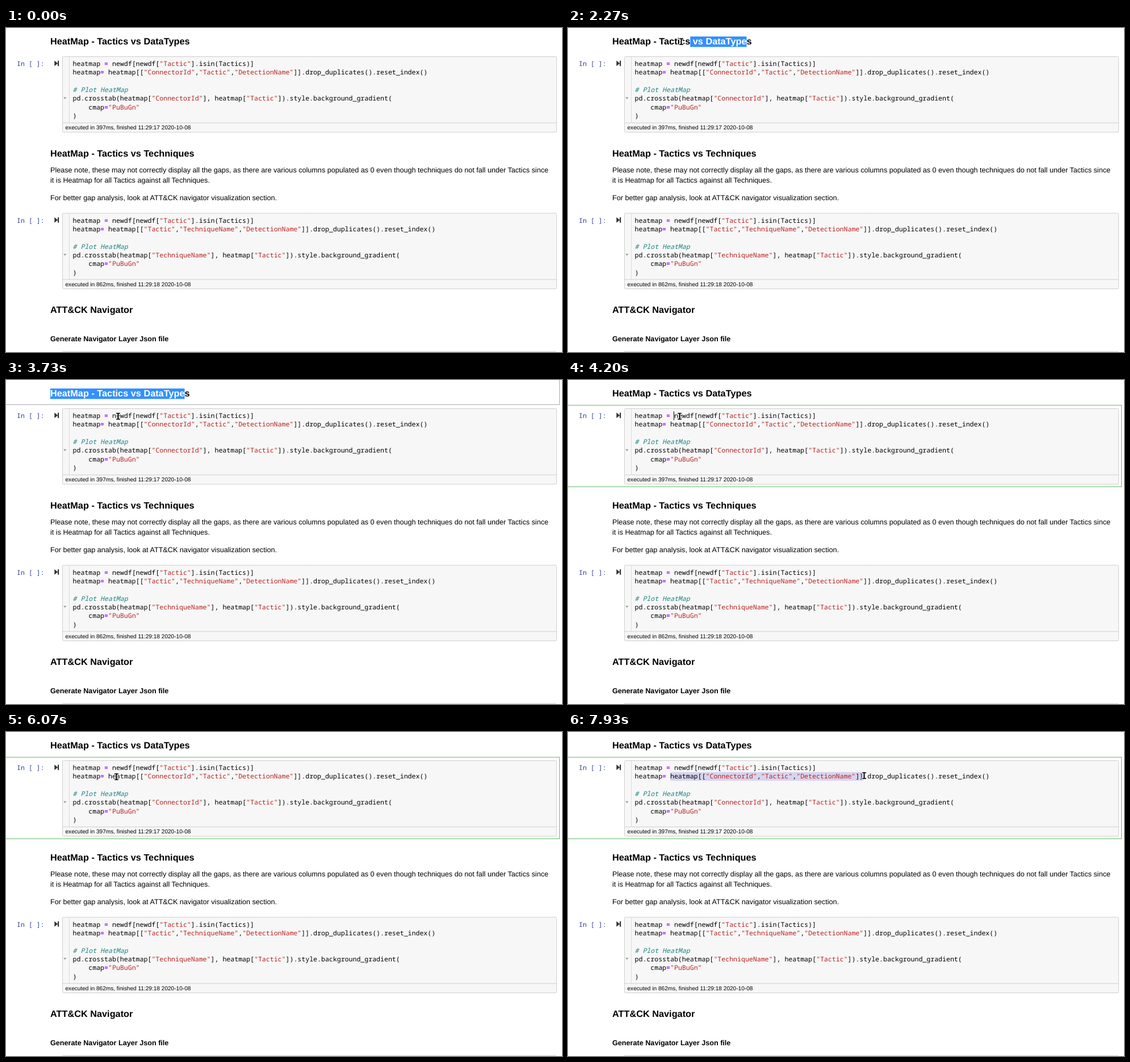
Write an HTML page with a canvas that moves like this. It is 979 by 572 pixels and loops after 8 s.

```html
<!DOCTYPE html>
<html lang="en">
<head>
<meta charset="utf-8">
<title>Notebook heatmaps</title>
<style>
html, body { margin: 0; width: 100%; height: 100%; overflow: hidden; background: #fff; }
canvas { display: block; }
</style>
</head>
<body>
<canvas id="stage" width="979" height="572"></canvas>
<script>
const ctx = document.getElementById('stage').getContext('2d');
const LOOP = 8000, FPS = 15;
const SANS = '"Liberation Sans", Arial, sans-serif';
const MONO = '"Noto Sans Mono", "DejaVu Sans Mono", monospace';
const BODY = `12.63px ${SANS}`;
const TITLE = `bold 16.29px ${SANS}`;
const CODE = `11.575px ${MONO}`;
const CHAR = 6.945, LINE = 15.3, LEFT = 78, CODE_X = 117.5, CODE_TOP = 55.4, CODE_BASE = 67;
const HEADING = 'HeatMap - Tactics vs DataTypes';

// Moments in ticks of 1/15 s
const ENTER = 4, BEAM = 24, DRAG_TITLE = 30, RELEASE = 43;
const CLICK = 60, DRAG_1 = 62.5, CLICK_2 = 83, DRAG_2 = 93;

function move(start, end, x, y) {
  return { start, end, x, y };
}
const MOVES = [
  move(ENTER, 8, 472, 287),
  move(11, 17, 50, 2),
  move(17, 21, 76, 18),
  move(23, BEAM, 347, 20),
  move(BEAM, 25, 318, 24),
  move(29, 39, 80, 24),
  move(42, 46, 214, 64),
  move(46, 62, 188, 64),
  move(DRAG_1, 72, 457, 64),
  move(74, 80.6, 179, 80),
  move(CLICK_2, 87, 267, 79),
  move(87, 92, 181, 79),
  move(DRAG_2, 106, 449, 77),
  move(106, 119, 521, 77)
];

const clamp = (v, lo, hi) => Math.min(hi, Math.max(lo, v));
const glide = k => (k + k * k * (3 - 2 * k)) / 2;
const settle = k => 1 - (1 - k) ** 3;

// Sideways motion glides, vertical motion settles early
function pointer(tick) {
  let x = 958, y = 566;
  for (const m of MOVES) {
    const k = clamp((tick - m.start) / (m.end - m.start), 0, 1);
    x += (m.x - x) * glide(k);
    y += (m.y - y) * settle(k);
  }
  return [x, y];
}

function rect(x, y, w, h, color) {
  ctx.fillStyle = color;
  ctx.fillRect(x, y, w, h);
}

function text(str, x, y, font, color = '#000') {
  ctx.font = font;
  ctx.fillStyle = color;
  ctx.fillText(str, x, y);
}

function shape(points, color) {
  ctx.beginPath();
  points.forEach(([x, y]) => ctx.lineTo(x, y));
  ctx.closePath();
  ctx.fillStyle = color;
  ctx.fill();
}

function codeLine(line, y) {
  for (const m of line.matchAll(/(#.*)|("[^"]*")|(=)|[^"#=]+/g)) {
    const [token, comment, string, operator] = m;
    const style = comment ? 'italic ' : operator ? 'bold ' : '';
    const color = comment ? '#1f8080' : string ? '#ba2121' : operator ? '#aa22ff' : '#000';
    text(token, CODE_X + m.index * CHAR, y, style + CODE, color);
  }
}

function cellBox(dy) {
  ctx.save();
  ctx.translate(0, dy);
  ctx.beginPath();
  ctx.roundRect(99.5, 50.5, 870, 133.5, 2);
  ctx.fillStyle = '#f7f7f7';
  ctx.fill();
  ctx.strokeStyle = '#cfcfcf';
  ctx.lineWidth = 1;
  ctx.stroke();
  rect(111, 51, 1, 116, '#ddd');
  rect(100, 167, 869, 1, '#cfcfcf');
  shape([[101, 122.3], [106.6, 122.3], [103.8, 125.6]], '#999');
  shape([[85.3, 57.6], [91.2, 62.4], [85.3, 67.2]], '#333');
  rect(91, 57.8, 2.2, 9.4, '#333');
  ctx.restore();
}

function cellText(dy, lines, status) {
  const y = CODE_BASE + dy;
  text('In [ ]:', 19, y, CODE, '#303f9f');
  lines.forEach((line, i) => codeLine(line, y + i * LINE));
  text(status, 104.5, 179 + dy, `10.1px ${SANS}`);
}

function cellCode(first, columns) {
  return [
    'heatmap = newdf[newdf["Tactic"].isin(Tactics)]',
    `heatmap= heatmap[[${columns}]].drop_duplicates().reset_index()`,
    '',
    '# Plot HeatMap',
    `pd.crosstab(heatmap["${first}"], heatmap["Tactic"]).style.background_gradient(`,
    '    cmap="PuBuGn"',
    ')'
  ];
}
const DATA_CODE = cellCode('ConnectorId', '"ConnectorId","Tactic","DetectionName"');
const TECH_CODE = cellCode('TechniqueName', '"Tactic","TechniqueName","DetectionName"');

// Selected columns trail the pointer by half a tick; an empty selection is a blinking caret
function selectCode(tick, row, start, max, click, drag) {
  const x = pointer(Math.max(tick - 0.5, drag))[0];
  const end = clamp(Math.round((x - CODE_X) / CHAR), start, max);
  const left = CODE_X + start * CHAR, top = CODE_TOP + row * LINE;
  if (end > start) rect(left, top, (end - start) * CHAR, LINE, '#d7d4f0');
  else if ((tick - click) % 16 < 8) rect(Math.floor(left), top, 1, LINE, '#000');
}

function codeSelection(tick) {
  if (tick >= CLICK_2) selectCode(tick, 1, 9, 58, CLICK_2, DRAG_2);
  else if (tick >= CLICK) selectCode(Math.min(tick, 74), 0, 10, 46, CLICK, DRAG_1);
}

function headingSelection(tick) {
  if (tick < DRAG_TITLE || tick >= CLICK) return;
  const x = pointer(Math.min(tick - 0.5, 39))[0];
  ctx.font = TITLE;
  const edge = n => LEFT + ctx.measureText(HEADING.slice(0, n)).width;
  const last = HEADING.length - 1;
  let first = 0;
  while (first < last && edge(first + 1) < x + 3) first++;
  const left = edge(first), width = edge(last) - left;
  rect(left, 15, width, 18.5, '#3390ff');
  ctx.save();
  ctx.beginPath();
  ctx.rect(left, 15, width, 18.5);
  ctx.clip();
  text(HEADING, LEFT, 29, TITLE, '#fff');
  ctx.restore();
}

function focusFrame(tick) {
  if (tick < RELEASE) return;
  const editing = tick >= CLICK;
  ctx.strokeStyle = editing ? '#66bb6a' : '#ababab';
  ctx.lineWidth = 1;
  if (editing) ctx.strokeRect(-1.5, 44.5, 976, 144);
  else ctx.strokeRect(-1.5, -1.5, 976, 45);
}

function arrow(x, y) {
  const outline = [[0, 0], [0, 11.5], [2.6, 9], [4.4, 13], [6.4, 12.2], [4.7, 8.3], [8, 8.2]];
  shape(outline.map(([dx, dy]) => [x + dx + 0.5, y + dy + 0.5]), '#f7b02c');
  ctx.strokeStyle = '#3a2a10';
  ctx.lineWidth = 1;
  ctx.stroke();
}

function beam(x, y) {
  ctx.save();
  ctx.translate(Math.round(x), Math.round(y));
  const bars = (pad, color) => {
    const bar = (l, t, w, h) => rect(l - pad, t - pad, w + 2 * pad, h + 2 * pad, color);
    bar(-3, -6, 7, 1.5);
    bar(-0.5, -6, 2, 12);
    bar(-3, 4.5, 7, 1.5);
  };
  bars(1, 'rgba(255,255,255,0.85)');
  bars(0, '#000');
  ctx.restore();
}

function draw(time) {
  const tick = Math.floor((time % LOOP + 4) * FPS / 1000);
  ctx.textRendering = 'geometricPrecision';
  rect(0, 0, 979, 572, '#fff');
  cellBox(0);
  cellBox(276.5);
  rect(99, 571, 870, 1, '#cfcfcf');
  focusFrame(tick);
  codeSelection(tick);

  text(HEADING, LEFT, 29, TITLE);
  headingSelection(tick);
  cellText(0, DATA_CODE, 'executed in 397ms, finished 11:29:17 2020-10-08');
  text('HeatMap - Tactics vs Techniques', LEFT, 226.5, TITLE);
  text('Please note, these may not correctly display all the gaps, as there are various columns ' +
    'populated as 0 even though techniques do not fall under Tactics since', LEFT, 255, BODY);
  text('it is Heatmap for all Tactics against all Techniques.', LEFT, 273, BODY);
  text('For better gap analysis, look at ATT&CK navigator visualization section.', LEFT, 304, BODY);
  cellText(276.7, TECH_CODE, 'executed in 862ms, finished 11:29:18 2020-10-08');
  text('ATT&CK Navigator', LEFT, 503, TITLE);
  text('Generate Navigator Layer Json file', LEFT, 552.5, 'bold ' + BODY);

  if (tick >= BEAM) beam(...pointer(tick));
  else if (tick >= ENTER) arrow(...pointer(tick));
}

const begin = performance.now();
function loop() {
  draw(performance.now() - begin);
  requestAnimationFrame(loop);
}
loop();
</script>
</body>
</html>
```
